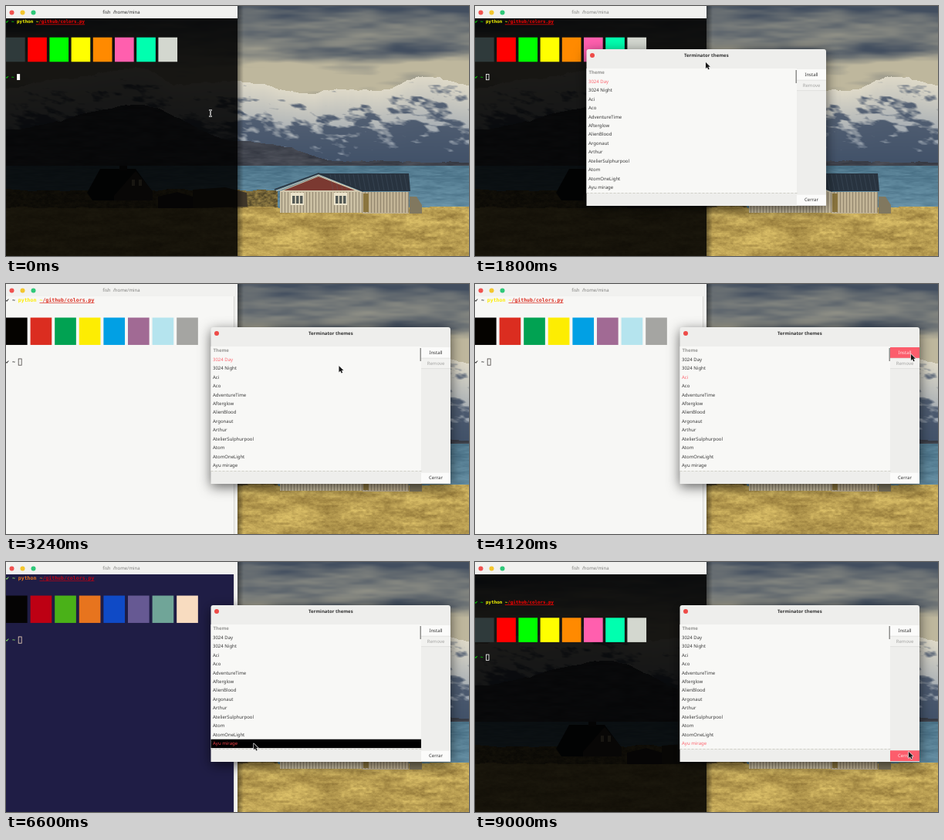
Write an HTML page with a canvas that moves like this. It is 600 px wide and 324 px high and loops after 9.04 s.

```html
<!DOCTYPE html>
<html>
<head>
<meta charset="utf-8">
<style>
html, body { margin: 0; width: 100%; height: 100%; overflow: hidden; background: #000; }
canvas { display: block; width: 600px; height: 324px; }
</style>
</head>
<body>
<canvas id="stage" width="600" height="324"></canvas>
<script>
const W = 600, H = 324, LOOP = 9040;
const SANS = '6px "Noto Sans", "Open Sans", sans-serif';
const g = document.getElementById('stage').getContext('2d');
g.textRendering = 'geometricPrecision';

const THEMES = {
  base: { bg: null, fg: '#fff', ok: '#00ff00', colors: '#2f3a3b #ff0000 #00ff00 #ffff00 #ff8a00 #ff5fae #00ffaf #d3d7cf' },
  day: { bg: '#f7f7f5', fg: '#4a4543', ok: '#101010', colors: '#050300 #db2d20 #01a252 #fded02 #01a0e4 #a16a94 #b5e4ee #a5a5a2' },
  aci: { bg: '#0d1926', fg: '#b4e1fd', ok: '#83ff08', colors: '#363636 #ff0883 #83ff08 #ff8308 #0883ff #8308ff #08ff83 #b6b6b6' },
  adventure: { bg: '#1f1d45', fg: '#f8dcc0', ok: '#9eff6e', colors: '#050404 #bd0013 #4ab118 #e7741e #0f4ac6 #665993 #70a598 #f8dcc0' },
  mirage: { bg: '#212733', fg: '#d9d7ce', ok: '#a6cc70', colors: '#191e2a #ed8274 #a6cc70 #fad07b #6dcbfa #cfbafa #90e1c6 #c7c7c7' }
};
const NAMES = ['3024 Day', '3024 Night', 'Aci', 'Aco', 'AdventureTime', 'Afterglow', 'AlienBlood',
  'Argonaut', 'Arthur', 'AtelierSulphurpool', 'Atom', 'AtomOneLight', 'Ayu mirage'];

// Each visit picks a list row, then presses Install.
const VISITS = [
  { theme: 'day', row: 0, x: 487, pick: 2440, apply: 3040 },
  { theme: 'aci', row: 2, x: 300, pick: 3540, apply: 4400 },
  { theme: 'adventure', row: 4, x: 350, pick: 5040, apply: 5720 },
  { theme: 'mirage', row: 12, x: 321, pick: 6580, apply: 7200 }
];
const OPEN = 1200, DRAG = 1860, DROP = 2120, RESET = 8200;
const DIALOG = { x: 144.5, y: 56, w: 310.5, h: 203, list: 272.5, shift: 121 };

const clamp = u => Math.min(1, Math.max(0, u));
const ease = u => u * u * (3 - 2 * u);
const lerp = (a, b, u) => a + (b - a) * u;
const mix = (a, b, u) => a.map((v, i) => lerp(v, b[i], clamp(u)));
const rowY = row => 98.2 + row * 11.42;

// Eased value at u along points [u, value].
function along(points, u) {
  const i = Math.max(1, points.findIndex(p => p[0] > u));
  const [u0, a] = points[i - 1], [u1, b] = points[i];
  return lerp(a, b, ease((u - u0) / (u1 - u0)));
}

const xs = [], ys = [];
function stay(x, y, from, to) {
  xs.push([from, x], [to, x]);
  ys.push([from, y], [to, y]);
}
stay(265, 139, 0, 200);
stay(300, 176, 1000, 1160);
stay(299, 73, 1720, DRAG);
stay(299 + DIALOG.shift, 73, DROP, DROP + 1);
for (const v of VISITS) {
  stay(v.x, rowY(v.row), v.pick - 100, v.pick + 40);
  stay(565, 91, v.apply - 320, v.apply);
}
stay(90, 150, 7760, RESET);
stay(562, 246, 8900, LOOP + 1);

function box(color, x, y, w, h, c = g) {
  c.fillStyle = color;
  c.fillRect(x, y, w, h);
}
function dot(color, x, y) {
  g.fillStyle = color;
  g.beginPath();
  g.arc(x, y, 3, 0, 7);
  g.fill();
}
function label(text, x, y, color, font = SANS, align = 'left') {
  g.font = font;
  g.textAlign = align;
  g.textBaseline = 'middle';
  g.fillStyle = color;
  g.fillText(text, x, y);
}

function hash(i, j) {
  const v = Math.sin(i * 127.1 + j * 311.7) * 43758.5453;
  return v - Math.floor(v);
}
function smooth(x, y) {
  const i = Math.floor(x), j = Math.floor(y), u = ease(x - i), v = ease(y - j);
  return lerp(lerp(hash(i, j), hash(i + 1, j), u), lerp(hash(i, j + 1), hash(i + 1, j + 1), u), v);
}
const noise = (x, y) => 0.55 * smooth(x, y) + 0.3 * smooth(2.1 * x, 2.1 * y) + 0.15 * smooth(4.3 * x, 4.3 * y);

const RIDGE = [[0, 106], [70, 94], [175, 79], [220, 101], [300, 97], [395, 113], [430, 107], [480, 110], [545, 90], [601, 103]];
const FOOTHILL = [[0, 160], [170, 128], [300, 174], [345, 179], [430, 200], [601, 202]];

function sky(x, y) {
  const cloud = 0.55 * Math.exp(-(((y - 57) / 11) ** 2)) * ease(clamp((x - 320) / 80));
  const light = ease(clamp((y + 8) / 95)) - cloud + 0.8 * (noise(x / 75, y / 13) - 0.5);
  return mix([66, 78, 95], [190, 183, 157], light);
}
function mountain(x, y, top) {
  const depth = (y - top) / (200 - top);
  const grain = noise((x - y * 0.7) / 17, y / 8);
  const snow = mix([222, 217, 200], [148, 159, 173], depth * 1.2);
  const rock = mix([92, 103, 120], [66, 82, 105], depth);
  return mix(snow, rock, 0.5 + 3 * (depth * 1.15 + 1.5 * grain - 1.32));
}
function land(x, y) {
  const fine = noise(x / 4, y / 2.5);
  if (y > 259 + 3 * smooth(x / 20, 1)) {
    const patch = 0.55 * fine + 0.75 * noise(x / 38, y / 7) - 0.08;
    return mix([132, 106, 48], [226, 198, 108], patch);
  }
  if (x < 352 && y > 236 + 4 * smooth(x / 15, 2)) return mix([62, 54, 32], [172, 147, 78], fine);
  if (y > 206) return mix([61, 99, 121], [112, 154, 174], 0.7 * noise(x / 14, y / 2) + (y - 206) / 150);
  const top = along(RIDGE, x) + 5 * (noise(x / 7, 3) - 0.5);
  if (y < top) return sky(x, y);
  if (y > along(FOOTHILL, x) + 4 * (noise(x / 9, 5) - 0.5)) return mix([45, 49, 59], [84, 87, 96], noise(x / 18, y / 4));
  return mountain(x, y, top);
}

function paintLandscape() {
  const canvas = document.createElement('canvas');
  canvas.width = W;
  canvas.height = H;
  const c = canvas.getContext('2d');
  const image = c.createImageData(W, H);
  for (let i = 0; i < W * H; i++) image.data.set([...land(i % W, Math.floor(i / W)), 255], i * 4);
  c.putImageData(image, 0, 0);

  const shape = (color, path) => {
    c.fillStyle = color;
    c.fill(new Path2D(path));
  };
  const line = (color, width, path) => {
    c.strokeStyle = color;
    c.lineWidth = width;
    c.stroke(new Path2D(path));
  };

  // near house
  shape('#c9bea2', 'M355 240L405 220L462 241V268H355Z');
  box('#c0b294', 462, 241, 60, 28, c);
  for (let x = 357; x < 522; x += 4) box('rgba(96,84,66,.5)', x, 241, 1, 27, c);
  shape('#7b3931', 'M360 239L405 221L452 239Z');
  shape('#28333f', 'M405 217H522L524 240H462Z');
  for (let x = 420; x < 520; x += 6) line('rgba(88,106,122,.4)', 0.7, `M${x} 218l4 21`);
  line('#28303a', 1.5, 'M348 238L405 217L463 240');
  line('#d9d0b8', 1, 'M350 240L405 219L462 242M355 240H455');
  for (const x of [369, 425]) {
    box('#ebe3cb', x, 242, 17, 16, c);
    for (const dx of [2, 7, 12]) box('#545a55', x + dx, 246, 3.5, 10, c);
  }
  box('#8b753e', 463, 243, 7, 24, c);
  shape('#81785f', 'M523 247H532L539 258V269H523Z');

  // farm on the left
  shape('#14171b', 'M105 242L122 211H168L190 241L175 252H112Z');
  box('#20211f', 147, 207, 10, 6, c);
  shape('#443a2e', 'M140 246L168 214L190 240V252H140Z');
  for (const x of [163, 172]) box('#c4b58d', x, 225, 4, 8, c);
  shape('#342d26', 'M197 247L222 241L242 247V262H197Z');
  shape('#3f3629', 'M242 238L284 235L312 242L313 260L242 262Z');
  return canvas;
}
const landscape = paintLandscape();

function drawTerminal(t) {
  const applied = VISITS.filter(v => v.apply <= t).pop();
  const theme = THEMES[applied && t < RESET ? applied.theme : 'base'];
  const colors = theme.colors.split(' ');
  const focused = t < OPEN;
  const cell = theme.bg ? 3.95 : 3.525;
  const line = theme.bg ? 8.85 : 7.9;
  const top = 17 + (t >= RESET ? 4 * line : 0);
  const mono = `bold ${cell / 0.602}px "DejaVu Sans Mono", "Noto Sans Mono", monospace`;

  const shadow = g.createLinearGradient(300, 0, 308, 0);
  shadow.addColorStop(0, 'rgba(0,0,0,.4)');
  shadow.addColorStop(1, 'rgba(0,0,0,0)');
  box(shadow, 300, 0, 8, H);
  box(theme.bg || 'rgba(0,0,0,.88)', 0, 16, 300, H);
  if (theme.bg) {
    box('#f1f1ef', 295, 16, 5, H);
    box('#d6d6d3', 295, 16, 1, H);
  }

  box('#f1f1ef', 0, 0, 300, 16);
  ['#f0524f', '#f3c62d', '#2ec878'].forEach((color, i) => dot(color, 7.5 + 14 * i, 8.5));
  label('fish  /home/mina', 149.5, 8.5, focused ? '#2e2e2e' : '#80807e', SANS, 'center');

  const prompt = row => {
    const y = top + (row + 0.5) * line;
    label('✔', 0, y, theme.ok, mono);
    label('~', 2 * cell, y, theme.ok, mono);
    return y;
  };
  const y = prompt(0);
  label('python', 4 * cell, y, colors[3], mono);
  label('~', 11 * cell, y, colors[3], mono);
  label('/github/colors.py', 12 * cell, y, colors[1], mono);
  box(colors[1], 11 * cell, y + 2.6, 18 * cell, 0.7);
  colors.forEach((color, i) => box(color, i * 8 * cell, top + 3 * line, 7 * cell, 4 * line));

  prompt(9);
  const cy = top + 9 * line;
  if (focused) {
    box(theme.fg, 4 * cell, cy, cell + 0.5, line);
  } else {
    g.strokeStyle = theme.fg;
    g.lineWidth = 0.8;
    g.strokeRect(4 * cell + 0.4, cy + 0.3, cell, line - 0.6);
  }
}

function drawDialog(t, px, py) {
  const { y: top, w, h, list, shift } = DIALOG;
  const x = DIALOG.x + shift * ease(clamp((t - DRAG) / (DROP - DRAG)));
  const visit = VISITS.filter(v => v.pick - 100 <= t).pop();
  const pressed = visit && t < visit.pick + 80;

  g.save();
  g.shadowColor = 'rgba(0,0,0,.6)';
  g.shadowBlur = 16;
  g.shadowOffsetY = 4;
  g.fillStyle = '#eeeeec';
  g.beginPath();
  g.roundRect(x, top, w, h, [3, 3, 0, 0]);
  g.fill();
  g.restore();
  dot('#ee4b48', x + 7.5, 64);
  label('Terminator themes', x + w / 2, 64, '#333', 'bold ' + SANS, 'center');

  box('#f8f8f6', x, 81, list, 161);
  label('Theme', x + 3, 86.7, '#969694', 'bold ' + SANS);
  NAMES.forEach((name, row) => {
    const y = rowY(row);
    const active = row === (visit ? visit.row : 0);
    if (active && pressed) box('#000', x, y - 5.5, list, 11.4);
    label(name, x + 2.5, y, !active ? '#383838' : pressed ? '#ef4146' : '#fc6670');
  });
  box('#8e8e8c', x + list - 1.5, 83, 1.5, 17);
  for (let dx = 0; dx < list; dx += 5) box('#d0d0c8', x + dx, 242, 3, 1);

  const button = (text, y, height, enabled) => {
    const hover = enabled && px > x + list && px < x + w && py > y && py < y + height;
    box('#d6d6d4', x + list, y, w - list, height + 0.7);
    box(hover ? '#fc5d6c' : enabled ? '#fbfbfa' : '#f2f2f0', x + list, y, w - list, height);
    label(text, x + (list + w) / 2, y + height / 2, hover ? '#ffe4e6' : enabled ? '#333' : '#a4a4a2', SANS, 'center');
  };
  button('Install', 82, 13.8, true);
  button('Remove', 96.4, 13, false);
  button('Cerrar', 244.3, 13.7, true);
  return px > x && py > top && py < top + h;
}

const ARROW = new Path2D('M0 0V8L1.9 6.3L3.2 9.3L4.6 8.7L3.3 5.8H5.8Z');
const BEAM = new Path2D('M-2 -4H2M0 -4V4M-2 4H2');

function drawPointer(x, y, arrow) {
  g.save();
  g.translate(x, y);
  g.lineJoin = 'round';
  g.strokeStyle = '#e8e8e8';
  g.lineWidth = arrow ? 1.3 : 2;
  g.stroke(arrow ? ARROW : BEAM);
  g.fillStyle = g.strokeStyle = '#161616';
  g.lineWidth = 0.7;
  if (arrow) g.fill(ARROW);
  else g.stroke(BEAM);
  g.restore();
}

const start = performance.now();
function render() {
  const t = (performance.now() - start) % LOOP;
  const x = along(xs, t), y = along(ys, t);
  g.drawImage(landscape, 0, 0);
  drawTerminal(t);
  const overDialog = t >= OPEN && drawDialog(t, x, y);
  drawPointer(x, y, overDialog || x > 300);
  requestAnimationFrame(render);
}
render();
</script>
</body>
</html>
```
